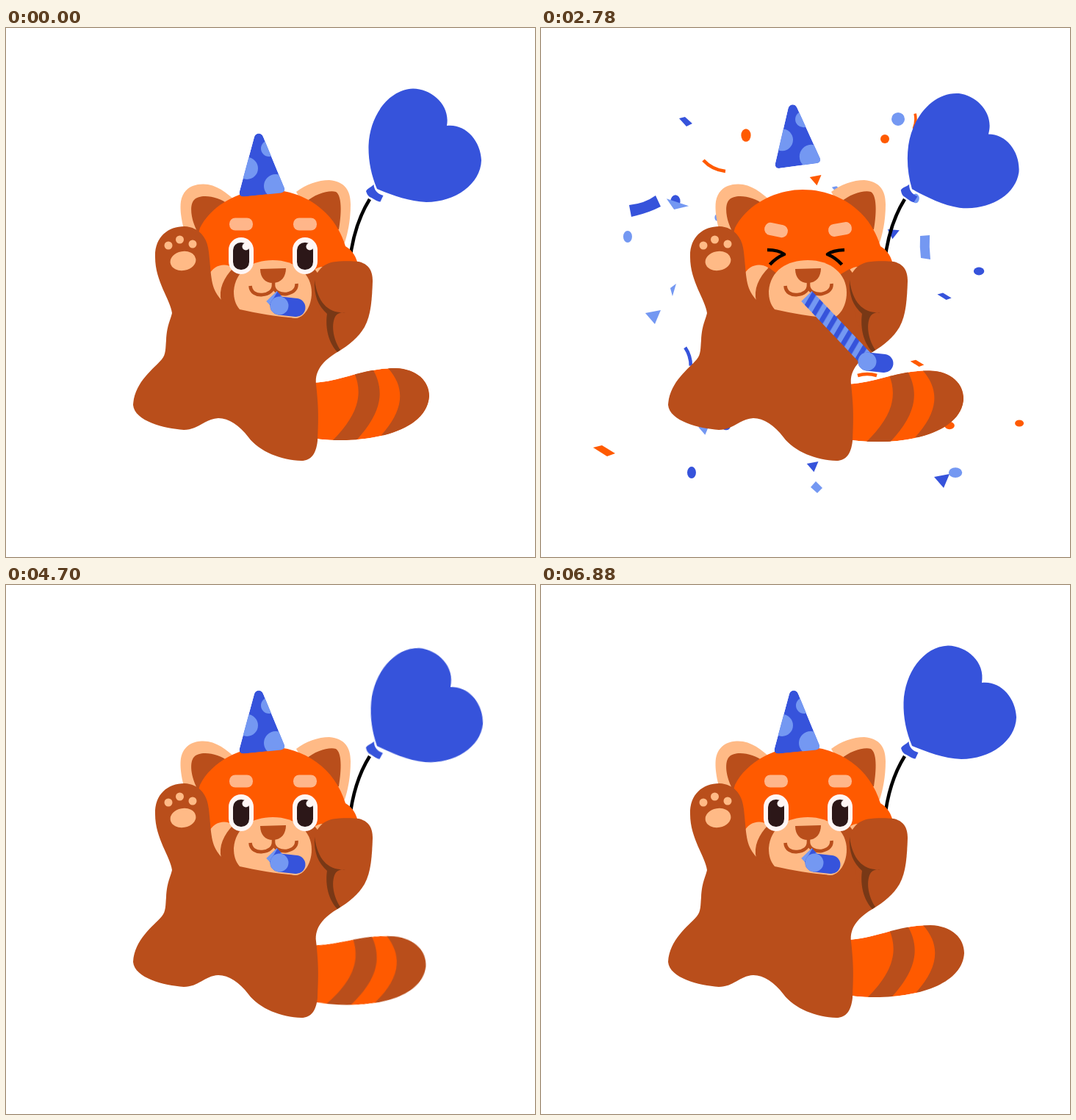
Write an HTML page that moves like this. It is 720 by 720 pixels and loops after 7.4 s.

```html
<!DOCTYPE html>
<html lang="en">
<head>
<meta charset="utf-8">
<title>Party red panda</title>
<style>
  html, body { margin: 0; height: 100%; overflow: hidden; background: #fff; }
  svg { display: block; width: 100%; height: 100%; }
  .brown { fill: #b94e1b; } .orange { fill: #ff5a00; } .peach { fill: #ffba86; }
  .blue { fill: #3653db; } .sky { fill: #7498f2; }
  .line { fill: none; stroke: #000; stroke-width: 4.6; }
</style>
</head>
<body>
<svg viewBox="0 0 720 720">
  <defs>
    <clipPath id="tailClip"><path id="tailShape" d="M400 482C445 488 478 463 530 463C560 464 576 481 576 501C574 540 520 561 455 561C435 561 420 560 400 553Z"/></clipPath>
    <clipPath id="hatClip"><path id="hatShape" d="M338 148C340 142 348 142 350 148L378.500 217Q381 223 374 224.500L324 229.500Q316 230 318 222Z"/></clipPath>
    <pattern id="stripes" width="14.300" height="20" patternUnits="userSpaceOnUse" patternTransform="skewX(16)">
      <rect class="sky" width="15" height="20"/><rect class="blue" x="1" width="7" height="20"/>
    </pattern>
  </defs>

  <g id="confetti"></g>

  <g id="tail"><g clip-path="url(#tailClip)">
    <use href="#tailShape" class="orange"/>
    <path class="brown" d="M474 469C487 500 478 528 443 563L477 561C515 520 514 490 499 464ZM519 462C545 490 541 520 511 554L590 570V455Z"/>
  </g></g>

  <g id="balloon" class="blue">
    <path d="M505 219C497 200 493 180 493.500 160C495 120 520 84 554 82.500C580 83 605 105 600 133C625 130 646 153 647 180C646 212 612 237 572 237C548 236 525 227 505 219Z"/>
    <path d="M500.500 213C501 221 506 226 513.500 228L509.500 236.500C504 236 500 232 495 230C492 228 491 225 490 222C492 218 497 217 500.500 213Z"/>
  </g>
  <path class="line" d="M495 233C480 257 471 287 467.500 320"/>

  <path class="peach" d="M252 300C240 275 236 250 238 236C242 214 262 211 275 213C292 216 305 229 316 238ZM395 223C408 213 425 207 440 207C462 209 469 222 469 240C469 262 465 280 461 292L440 300Z"/>
  <path class="brown" d="M263 282C250 260 250 240 256 234C264 225 290 229 302 240ZM408 237C420 226 440 220 449 223C457 228 457 250 453 274L430 280Z"/>
  <path class="orange" d="M277 350C258 320 258 290 264 272C280 240 320 220 356 220C406 220 448 250 462 297C469 301 475 308 478 318L470 380L300 390Z"/>
  <path class="peach" d="M275 338C282 322 298 319 309 326L305 378L285 366ZM420 329C428 323 436 324 444 330L440 350Z"/>
  <path class="brown" d="M310 326C296 340 289 356 293 372L325 390L322 335ZM408 335L420 328L432 345L430 395L405 392Z"/>

  <g id="hat"><g clip-path="url(#hatClip)">
    <use href="#hatShape" class="blue"/>
    <g class="sky"><circle cx="358" cy="164" r="11"/><circle cx="328" cy="191" r="15"/><circle cx="367" cy="215" r="16"/></g>
  </g></g>

  <path class="brown" d="M243 270C262 271 274 284 276 305C280 340 278 352 292 369C300 376 310 381 318 383L395 395L425 340L453 440C432 452 420 466 422 485C426 520 425 535 424 562C422 580 415 589 402 589C375 588 345 577 330 557C318 541 303 531 289 531C270 532 262 547 242 547C215 545 175 535 173 513C175 482 200 465 212 451C218 444 217 435 218 425C219 405 223 400 226 388C224 370 203 345 203 312C202 285 220 270 243 270Z"/>
  <path class="brown" d="M419 350C420 335 428 322 445 318.500C455 317 470 317 480 318C492 321 499 328 499 345C498 370 497 390 488 407C480 421 466 432 453 440L430 400Z"/>
  <path fill="#783816" d="M420 343C419 365 425 378 437 389C435 402 436 425 451 441L455 438C446 425 442 405 448 393C451 388 455 387 462 387C440 389 424 375 420 343Z"/>
  <g class="peach">
    <circle cx="221" cy="296" r="5.500"/><circle cx="236.500" cy="288" r="5.500"/><circle cx="254" cy="294" r="5.500"/>
    <ellipse cx="241" cy="317" rx="17.500" ry="13" transform="rotate(-10 241 317)"/>
    <path d="M310 358C312 330 335 316 363 316C395 316 416 335 416 360C416 380 405 394 395 395C370 393 340 388 318 383C312 376 310 368 310 358Z"/>
  </g>
  <path class="brown" d="M346 328L381 327C381 338 375 347 363 347C353 347 346 340 346 328Z"/>
  <path class="line" style="stroke:#b94e1b" d="M332.500 351C333 360 341 364 349 363C357 362.500 364 358 364 350V345M364 350C364 359 374 363 382 362C391 360 396 356 395.500 348"/>

  <g id="brows" fill="#ffb68a">
    <rect x="304" y="258.500" width="32" height="17" rx="8"/>
    <rect x="391" y="258.500" width="32" height="17" rx="8"/>
  </g>
  <g id="eyes">
    <g id="eye"><rect x="303" y="285" width="34" height="50" rx="17" fill="#fff6f5"/>
      <rect x="309" y="292" width="22" height="37" rx="10.500" fill="#2c1718"/>
      <circle cx="326.500" cy="297.500" r="5" fill="#fff6f5"/></g>
    <use href="#eye" x="87"/>
  </g>
  <path id="squint" class="line" stroke-linejoin="round" d="M308 302C318 302 326 304 331 308C324 311 317 316 311.500 322M413 302C402 302.500 395 304 390 308C397 311 404 316 409.500 322"/>

  <g transform="translate(361.500 365) rotate(46.500) translate(0 -10)"><rect id="tube" height="20" fill="url(#stripes)"/></g>
  <g id="coil">
    <path d="M372 378L395 380.500" fill="none" stroke="#3653db" stroke-width="25" stroke-linecap="round"/>
    <circle class="sky" cx="372" cy="378" r="12.500"/>
  </g>
</svg>
<script>
const LOOP = 7400, ACTIVE = 6880, BLOW = 1970;
const $ = id => document.getElementById(id);
const set = (el, name, value) => el.setAttribute(name, value);
const clamp = v => Math.min(1, Math.max(0, v));
const ease = (t, from, to) => (1 - Math.cos(Math.PI * clamp((t - from) / (to - from)))) / 2;
const pulse = (t, a, b, c, d) => ease(t, a, b) - ease(t, c, d);
const fade = (t, from, to) => clamp((t - from) / 100) - clamp((t - to) / 100);
const [leftBrow, rightBrow] = $('brows').children;

// Confetti rows: shape, colour, x, y, rotation, optional scale
const shapes = {
  oval: 'M-6 0A6 8 0 1 1 6 0A6 8 0 1 1 -6 0Z',
  dot: 'M-6 0A6 6 0 1 1 6 0A6 6 0 1 1 -6 0Z',
  chip: 'M-9 -4L-1 -6L9 3L1 7Z',
  slat: 'M-15 -4L-3 -7L15 4L4 8Z',
  kite: 'M-8 0L-1 -8L8 1L1 8Z',
  tri: 'M-11 -4L10 -8L2 11Z',
  sliver: 'M-4 -2L4 -8L-1 9Z',
  arc: 'M-15 -8Q-3 5 15 7',
  line: 'M-13 1Q0 -3 13 1',
  band: 'M-21 -1Q0 -3 15 -14L22 1Q5 10 -18 15Z',
  bar: 'M-7 -15L6 -16Q5 0 7 17L-6 15Q-8 0 -7 -15Z',
};
const colours = { b: '#3653db', s: '#7498f2', o: '#ff5a00' };
const pieces = `chip b 197 127 0|oval o 279 146 0 1.1|arc o 236 188 0|dot s 486 124 0 1.5
dot o 468 151 0|line o 509 127 95 .8|band b 141 242 0|oval b 183 236 0 1.1|sliver s 185 240 -88 1.8
oval s 118 284 0|sliver s 180 356 0|tri s 153 392 0|line b 201 447 73|slat o 86 575 0
oval b 205 605 0|kite s 375 625 0|tri b 370 596 0 .75|tri s 222 546 0 .7|tri b 546 615 0
oval s 564 605 90 1.15|oval o 651 538 90 .75|oval o 556 541 90 .85|slat o 512 456 0 .62
line o 444 472 0|slat b 549 365 0 .64|oval b 596 331 90 .9|bar s 523 298 0
tri b 479 279 15 .75|tri o 374 206 0 .75|chip s 403 220 0 .8|oval s 510 232 0 .8
oval b 252 543 90 .7|oval s 240 258 0 .6`.split(/[|\n]/).map(row => {
  const [shape, colour, x, y, turn, scale = 1] = row.split(' ');
  const el = document.createElementNS('http://www.w3.org/2000/svg', 'path');
  const thin = shape === 'arc' || shape === 'line';
  set(el, 'd', shapes[shape]);
  set(el, 'fill', thin ? 'none' : colours[colour]);
  if (thin) { set(el, 'stroke', colours[colour]); set(el, 'stroke-width', 4.6); }
  $('confetti').append(el);
  return { el, x: x - 365, y: y - 380, turn: +turn, scale };
});

function draw(time) {
  const t = Math.min(time % LOOP, ACTIVE);

  const float = pulse(t, 0, 2060, 2060, 4110) + pulse(t, 4110, 5490, 5490, ACTIVE);
  const wag = pulse(t, 0, 1740, 1740, 3230) + pulse(t, 3230, 4920, 4920, ACTIVE);
  set($('balloon'), 'transform', `rotate(${8.8 * float} 502 219)`);
  set($('tail'), 'transform', `rotate(${4.2 * wag} 312 445)`);

  const squint = fade(t, BLOW, 4120) + fade(t, 5455, 6220);
  const closed = squint > 0;
  set($('squint'), 'opacity', squint);
  set($('eyes'), 'opacity', closed ? 0 : 1);
  set(leftBrow, 'transform', closed ? 'translate(0 8) rotate(12 320 267)' : '');
  set(rightBrow, 'transform', closed ? 'translate(0 7) rotate(-10 407 267)' : '');

  const horn = pulse(t, BLOW, 2190, 4040, 4300);
  set($('tube'), 'width', 17 + 105 * horn);
  set($('coil'), 'transform', `translate(${72 * horn} ${76 * horn})`);

  const lift = pulse(t, BLOW, 2230, 4030, 4340);
  const tilt = -5 * clamp((t - BLOW) / 2040) * lift;
  set($('hat'), 'transform', `translate(${-0.6 * tilt} ${-39.5 * lift}) rotate(${tilt} 348.5 225.5)`);

  const age = t - BLOW;
  const spread = 1.05 * (1 - Math.exp(-Math.max(0, age) / 266));
  set($('confetti'), 'opacity', age > 0 ? 1 - clamp((t - 3480) / 300) : 0);
  for (const p of pieces)
    set(p.el, 'transform', `translate(${365 + p.x * spread} ${380 + p.y * spread}) rotate(${p.turn + 160 * (spread - 1)}) scale(${p.scale})`);
}

const start = performance.now();
function tick() {
  draw(performance.now() - start);
  requestAnimationFrame(tick);
}
tick();
</script>
</body>
</html>
```
